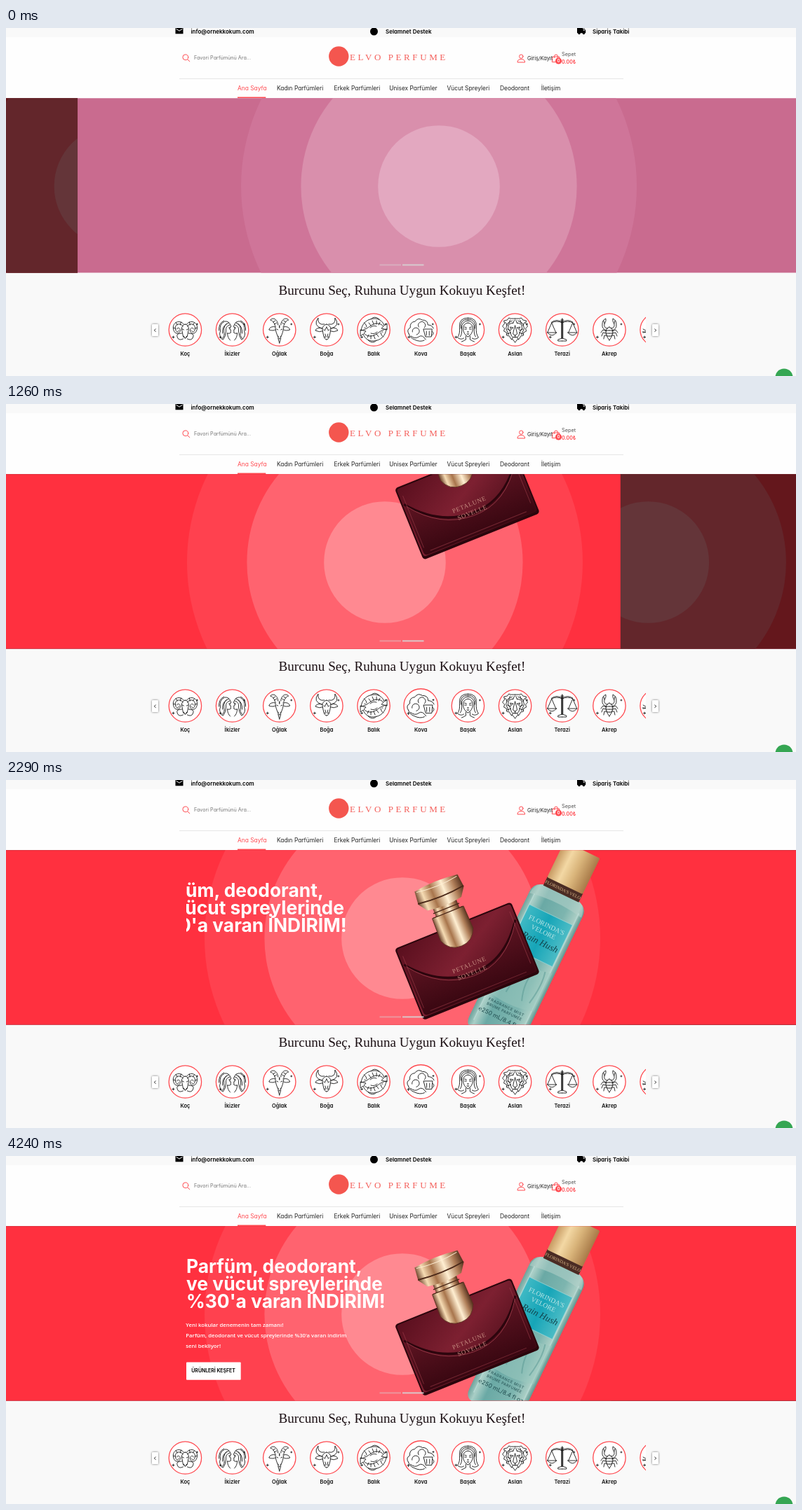
These frames come from a looping animation (1126 by 497 pixels, 6030 ms). An HTML page:

```html
<!DOCTYPE html>
<html lang="tr">
<head>
<meta charset="utf-8">
<title>Parfüm mağazası</title>
<style>
  html, body { margin: 0; width: 100%; height: 100%; overflow: hidden; background: #f9f9f9; }
  svg { display: block; width: 100vw; height: 100vh; font-family: Inter, sans-serif; font-feature-settings: "cv11"; }
  .serif { font-family: "Liberation Serif", serif; }
  .top { font-size: 8px; font-weight: 600; }
  .nav { font-size: 8.4px; fill: #222; }
  .red { fill: #ff4a50; }
  .line { fill: none; stroke: #ff4a50; stroke-width: 1; }
  .heading { font-size: 26.4px; font-weight: 700; font-feature-settings: normal; fill: #fff; }
  .copy { font: 600 7.75px "Open Sans", sans-serif; fill: #fff; }
  .cta { font-size: 6.9px; font-weight: 700; fill: #111; }
  .sign { font-size: 7.5px; font-weight: 600; text-anchor: middle; fill: #111; }
  .art { fill: none; stroke: #1a1a1a; stroke-width: .9; stroke-linejoin: round; stroke-linecap: round; }
  .mid { text-anchor: middle; }
</style>
</head>
<body>
<svg viewBox="0 0 1126 497">
  <defs>
    <linearGradient id="gold">
      <stop offset="0" stop-color="#6b4029"/><stop offset=".16" stop-color="#f6dcb4"/>
      <stop offset=".36" stop-color="#a8754c"/><stop offset=".6" stop-color="#ffefd2"/>
      <stop offset=".82" stop-color="#b1805a"/><stop offset="1" stop-color="#54301d"/>
    </linearGradient>
    <linearGradient id="capGold">
      <stop offset="0" stop-color="#c79a62"/><stop offset=".3" stop-color="#f3d8a4"/>
      <stop offset=".6" stop-color="#d9b47a"/><stop offset="1" stop-color="#a87a48"/>
    </linearGradient>
    <linearGradient id="wine" x2="1" y2="1">
      <stop offset="0" stop-color="#5a0f1e"/><stop offset=".45" stop-color="#7d2031"/>
      <stop offset="1" stop-color="#3c0812"/>
    </linearGradient>
    <linearGradient id="wineLow" x2="0" y2="1">
      <stop offset="0" stop-color="#5e1422"/><stop offset="1" stop-color="#390711"/>
    </linearGradient>
    <linearGradient id="glass">
      <stop offset="0" stop-color="#6da39c"/><stop offset=".12" stop-color="#a9cec6"/>
      <stop offset=".3" stop-color="#6aa9a5"/><stop offset=".7" stop-color="#7db5af"/>
      <stop offset=".9" stop-color="#a9cdc4"/><stop offset="1" stop-color="#5f9790"/>
    </linearGradient>
    <linearGradient id="label">
      <stop offset="0" stop-color="#3fb9c4"/><stop offset=".5" stop-color="#16a5b8"/>
      <stop offset="1" stop-color="#4cbcc5"/>
    </linearGradient>
    <filter id="shade" x="-80%" y="-50%" width="260%" height="200%">
      <feDropShadow dx="0" dy="0" stdDeviation="1.8" flood-opacity=".6"/>
    </filter>
    <clipPath id="stage"><rect y="100.3" width="1126" height="249.3"/></clipPath>
    <clipPath id="darkClip"><rect id="darkEdge" y="100" width="0" height="250"/></clipPath>
    <clipPath id="redClip"><rect id="redEdge" y="100" width="0" height="250"/></clipPath>
    <clipPath id="headClip"><rect x="257" y="138" width="300" height="90"/></clipPath>
    <clipPath id="ctaClip"><rect id="ctaEdge" x="257" y="290" width="0" height="34"/></clipPath>
    <clipPath id="listClip"><rect x="220" y="400" width="692" height="80"/></clipPath>
  </defs>

  <rect width="1126" height="497" fill="#f9f9f9"/>
  <rect y="13" width="1126" height="87.3" fill="#fefefe"/>

  <!-- top bar -->
  <path d="M241.5-1h11v9.3h-11z"/>
  <path d="M242.5 1.2l4.5 3 4.5-3" fill="none" stroke="#fff"/>
  <circle cx="524.5" cy="5" r="5.5"/>
  <path d="M814-1h8v2h2.5l1.7 2.5v3.7h-12.2z"/>
  <path d="M822.8 2h1.4l1 1.6h-2.4z" fill="#fff"/>
  <circle cx="817" cy="7.5" r="1.7"/><circle cx="823.4" cy="7.5" r="1.7"/>
  <g class="top">
    <text x="263.5" y="8">info@ornekkokum.com</text>
    <text x="541" y="8">Selamnet Destek</text>
    <text x="836" y="8">Sipariş Takibi</text>
  </g>

  <!-- header -->
  <g class="line" stroke-linecap="round">
    <circle cx="255.8" cy="41.8" r="3.9"/><path d="M258.7 44.8l3 3"/>
    <circle cx="734.3" cy="40.6" r="2.7"/><path d="M729 48.6q0-4 5.3-4t5.3 4z"/>
    <path d="M779.5 41h9l.8 7.6h-10.6zM781.7 42.5v-2.3q0-2.2 2.3-2.2t2.3 2.2v2.3"/>
  </g>
  <circle cx="787.5" cy="47" r="4.5" class="red"/>
  <text x="787.5" y="49.3" class="mid" font-size="6.2" font-weight="600" fill="#fff">0</text>
  <text x="268" y="45" font-size="7.2" fill="#777">Favori Parfümünü Ara...</text>
  <circle cx="474.3" cy="40.5" r="14.2" fill="#f4564f"/>
  <text x="490" y="46.4" class="serif" font-size="13" letter-spacing="3.6" fill="#f4605c">ELVO PERFUME</text>
  <text x="743" y="45.5" font-size="7.4" fill="#222">Giriş/Kayıt</text>
  <text x="792" y="39.6" font-size="7.3" fill="#555">Sepet</text>
  <text x="792" y="51" font-size="7.1" font-weight="600" class="red">0.00₺</text>
  <path d="M247 72.4h633" stroke="#e5e5e5"/>
  <g class="nav">
    <text x="330" y="88.6" class="red">Ana Sayfa</text>
    <text x="386" y="88.6">Kadın Parfümleri</text>
    <text x="467.5" y="88.6">Erkek Parfümleri</text>
    <text x="546.3" y="88.6">Unisex Parfümler</text>
    <text x="628.5" y="88.6">Vücut Spreyleri</text>
    <text x="704" y="88.6">Deodorant</text>
    <text x="762.7" y="88.6">İletişim</text>
  </g>
  <path d="M330 99.3h40.3" stroke="#ff4a50" stroke-width="1.5"/>

  <!-- slider -->
  <g clip-path="url(#stage)">
    <g id="pink"></g>
    <g clip-path="url(#darkClip)"><g id="dark"></g></g>
    <g clip-path="url(#redClip)">
      <g id="red"></g>
      <g id="mist">
        <g transform="translate(787.5 165) rotate(25.7)">
          <path d="M-26-10h52Q42-6 42 8V206Q42 221 26 221H-26Q-42 221-42 206V8Q-42-6-26-10z" fill="url(#glass)"/>
          <path d="M-26-10h52Q40-6 41 10 0 2-41 10-40-6-26-10z" fill="#b4d2ca" opacity=".55"/>
          <path d="M-34 8V208M35 6V206" stroke="#c4e2dc" stroke-width="2" opacity=".6"/>
          <path d="M-38 100q38 10 76 0v60q-40 12-76 0z" fill="#9ccabf" opacity=".5"/>
          <path d="M-30 102q8 25-2 52M-12 106q6 20 2 46M14 106q-8 22 2 48M28 102q5 20-1 50" fill="none" stroke="#4f918d" stroke-width="2" opacity=".45"/>
          <rect x="-28" y="-22" width="56" height="14" fill="#4b2c24"/>
          <rect x="-28" y="-78" width="56" height="57" rx="2" fill="url(#capGold)"/>
          <rect x="-34" y="25" width="68" height="66" fill="url(#label)" stroke="#a7dbdc" stroke-width=".6"/>
          <g class="serif mid">
            <text y="-12.5" font-size="6.4" fill="#dcb88a">FLORINDA'S VELO</text>
            <text x="1" y="44" font-size="9.6" fill="#bfe6e6">FLORINDA'S</text>
            <text x="1" y="55" font-size="9.6" fill="#bfe6e6">VELORE</text>
            <text x="3" y="71" font-size="13" font-style="italic" fill="#12434c">Rain Hush</text>
          </g>
          <g class="mid" fill="#1f4c4e" font-size="5.4">
            <text y="173" letter-spacing=".6">FRAGRANCE MIST</text>
            <text y="180" letter-spacing=".4">BRUME PARFUMÉE</text>
            <text y="192" font-size="8.4">℮250 mL/8.4 fl oz</text>
          </g>
        </g>
      </g>
      <g id="perfume">
        <g transform="translate(657.5 257.5) rotate(-22)">
          <rect x="-90" y="-54" width="179" height="110" rx="4.5" fill="#2b050c"/>
          <rect x="-88" y="-52" width="175" height="104" rx="4" fill="url(#wine)"/>
          <path d="M-86-28Q-50 18 0 20T85-28V46Q85 51 79 51H-80Q-86 51-86 46z" fill="url(#wineLow)"/>
          <path d="M-86-28Q-50 18 0 20T85-28" fill="none" stroke="#2c050d" stroke-width="3"/>
          <path d="M-84-24Q-50 22 0 24T83-24" fill="none" stroke="#9c3b49" stroke-width=".8"/>
          <path d="M-83-40V40M82-42V38M-76 47H72" fill="none" stroke="#a4414e" opacity=".55"/>
          <path d="M-24-74h48l1 34Q18-22 0-22T-25-40z" fill="url(#gold)" stroke="#5a3020" stroke-width=".8"/>
          <path d="M-18-88h36v14h-36z" fill="url(#gold)"/>
          <path d="M-20-80h40M-23-74h46" stroke="#4a2818" stroke-width="1.3"/>
          <path d="M-33-119q33-5 66 0l2 19-9 13q-26 5-52 0l-9-13z" fill="url(#gold)"/>
          <path d="M-35-101q35 5 70 0" fill="none" stroke="#4a2818" stroke-width="2"/>
          <path d="M-31-117q31 5 62 0" fill="none" stroke="#fff0d6"/>
          <g class="serif mid" fill="#c78c80" font-size="9" letter-spacing=".7">
            <text y="10">PETALUNE</text><text y="22">SOVELLE</text>
          </g>
        </g>
      </g>
      <g clip-path="url(#headClip)">
        <g id="heading" class="heading">
          <text x="257" y="167.4">Parfüm, deodorant,</text>
          <text x="257" y="192.2">ve vücut spreylerinde</text>
          <text x="257" y="217">%30'a varan İNDİRİM!</text>
        </g>
      </g>
      <g id="copy" class="copy">
        <text x="256.3" y="244">Yeni kokular denemenin tam zamanı!</text>
        <text x="256.3" y="259">Parfüm, deodorant ve vücut spreylerinde %30'a varan indirim</text>
        <text x="256.3" y="274">seni bekliyor!</text>
      </g>
      <g clip-path="url(#ctaClip)">
        <rect x="257" y="294.4" width="77.7" height="25.4" rx="1" fill="#fff"/>
        <text id="cta" class="cta" x="264.3" y="309.3"></text>
      </g>
    </g>
    <rect x="532.5" y="337.4" width="30.5" height="2" fill="#d8d0d2" opacity=".45"/>
    <rect x="565" y="337.4" width="30.5" height="2" fill="#d8d0d2" opacity=".9"/>
  </g>

  <!-- zodiac list -->
  <text x="388.5" y="381.3" class="serif" font-size="19.15" fill="#1c1014">Burcunu Seç, Ruhuna Uygun Kokuyu Keşfet!</text>
  <g id="signs" clip-path="url(#listClip)"></g>
  <g fill="#fff" filter="url(#shade)">
    <rect x="208" y="423" width="9" height="17" rx="1.5"/><rect x="921" y="423" width="9" height="17" rx="1.5"/>
  </g>
  <path d="M213.6 429.7l-2.4 2 2.4 2M924.4 429.7l2.4 2-2.4 2" fill="none" stroke="#222" stroke-width=".9"/>
  <circle cx="1109" cy="499" r="12.6" fill="#35a653"/>
</svg>

<script>
const LOOP = 6030, W = 1126, CTA = 'ÜRÜNLERİ KEŞFET';
const $ = id => document.getElementById(id);

// Slide backgrounds: base colour, then rings from large to small.
const slides = {
  pink: ['#c96b8f', '#cf7599', '#d98fac', '#e3a8c0'],
  dark: ['#621318', '#64171c', '#63262b', '#643539'],
  red: ['#ff303f', '#ff414f', '#ff636f', '#ff8991']
};
for (const [id, [base, ...rings]] of Object.entries(slides)) {
  $(id).innerHTML = `<rect x="-${W}" y="100" width="${3 * W}" height="250" fill="${base}"/>` +
    rings.map((c, i) => `<circle cx="565" cy="226" r="${[282, 196.6, 86.8][i]}" fill="${c}"/>`).join('');
}

// Each sign: name, path, and the transform of its repeated half, if any.
const FLIP = 'scale(-1 1)', TURN = 'rotate(180)';
const signs = [
  ['Koç', 'M2-8C8-15 18-11 17-2C16 7 8 7 7 1C7-3 11-4 12-1M3-5C8-11 15-8 14-1C13 4 10 4 9 1M6-11l1 4M13-10l-2 3M17-3l-3 1M0-8Q5-7 5-1L3 9Q2 12 0 12M2 0l2-1M1 10l2-1M5 5q9 0 6 6q-2 5-8 2', FLIP],
  ['İkizler', 'M2-5l2 4-2 1q1 2 0 4 2 2 5 1M2-5Q4-13 11-12 19-8 17 2 20 8 14 14M5-10Q13-7 12 3 10 9 15 13M8-9q7 5 6 14M4-7q6 2 5 9 0 7 4 12M7 5q0 6-4 10M3-3h2M12-13q8 4 7 14', FLIP],
  ['Oğlak', 'M2-7C2-14 9-19 13-14 9-13 7-9 6-5M4-10l3 2M6-13l3 2M5-4Q13-6 15 0 9 2 6 0M6-3Q5 4 3 8 2 12 0 13M2 0l2-1M1 10l1-1M2 12L0 19M0-6v3', FLIP],
  ['Boğa', 'M3-8Q13-6 12-17 20-6 7-2M6-2Q14-4 16 1 10 4 6 2M0-8Q6-6 6-1 5 6 4 9 3 14 0 14M2 1l2-1M1.5 11l1.5-1M0-4l2 4M2 6l-1 4', FLIP],
  ['Balık', 'M-18 1C-17-9-9-16 1-16 8-16 13-12 15-6l4-3v9l-8-2 3-3C10-9 5-10 0-8-6-6-8-1-18 1zM-10-4q-1-5-4-6M-7-10l3 4M-2-13l2 5M4-13v5M9-11l-2 4M-13-3h1M-4-15q5-6 12 0M-5-3q4-4 9-2', TURN],
  ['Kova', 'M-17 6q-4-6 2-9-1-8 7-9 4-6 10-2 8 0 8 7 6 0 8 5M-12 3a5 5 0 1 1 6 4M-3-4a5 5 0 1 1 8 1M-14 9q6 5 11 1t10 4M-17 6q2 6 8 8 8 4 14 1M4-1h12l-1 11H7zM16 2q4 3 0 6M8 2v6M12 2v6'],
  ['Başak', 'M0-10Q7-9 7-1 6 7 0 10M0-17Q13-17 12-4 11 6 15 11 10 15 6 12M0-13Q9-12 9-2 8 6 11 10M3 9v5q3 2 6 3M2-1h3M2-3l3-1M0 6h1.5M0 3h1M0-15q12 0 10 13', FLIP],
  ['Aslan', 'M0-16h6l3-1 2 3 5 1-1 4 3 4-3 3 1 4-4 2v4l-4 1-2 4-3 1-3 4M3-10l6 2 1 6-3 5-2 6M4-13l7 4 2 7-4 9M0-6l2 7 1 5-3 2M3-3l4-1-1 3zM0 8v3l4-1M6 1l5-2M6 4l5 2M3 11l2 3M1-14l2 5M7-14l2 5M14-11l-3 5', FLIP],
  ['Terazi', 'M0-16V12M1-13V12M0-11q8-5 15 0M0-10q8-4 15 0M15-10L9 4M15-10l6 14M8 4h13M8 4q7 8 13 0M0 12l6 2v2H0M0-14h2', FLIP],
  ['Akrep', 'M2-2Q8-2 7-8 4-13 5-16q5 2 5 8 1 7-6 9M7-9l1-4M4 2l5-2 3 4M4 5l5-1 2 5M3 8l4 0 1 5M0-4Q5-2 5 3 5 8 0 15M0 1h4M0 5h4M0 9h3', FLIP],
  ['Yay', 'M19-1L12 3l7 1M20 3H8', FLIP]
];
$('signs').innerHTML = signs.map(([name, d, half], i) => {
  const x = 255.4 + 67.17 * i;
  const twin = half ? `<path d="${d}" transform="${half}"/>` : '';
  return `<g transform="translate(${x} 431)"><g id="sign${i}">
    <circle r="23.2" fill="#fff" stroke="#ff4a50" stroke-width="1.3"/>
    <g class="art"><path d="${d}"/>${twin}
    <path d="M-17 9v3m-1.5-1.5h3M17-9v2m-1-1h2"/></g></g></g>
    <text class="sign" x="${x}" y="467.7">${name}</text>`;
}).join('');

$('cta').innerHTML = [...CTA].map(c => `<tspan>${c}</tspan>`).join('');
const letters = [...$('cta').children];

// Progress with a power ease-out.
const out = (t, start, length, power) =>
  1 - (1 - Math.min(1, Math.max(0, (t - start) / length))) ** power;
const move = (id, x, y = 0) => $(id).setAttribute('transform', `translate(${x} ${y})`);
const width = (id, w) => $(id).setAttribute('width', w);

function render(t) {
  const darkX = W * out(t, -31, 690, 2);
  const redX = W * out(t, 707, 1048, 2);
  width('darkEdge', darkX);
  width('redEdge', redX);
  move('pink', .51 * darkX);
  move('dark', .4 * (redX + darkX - W));
  move('red', -.1 * (W - redX));

  move('perfume', 0, -250 * (1 - out(t, 1088, 800, 3)));
  move('mist', 0, 300 * (1 - out(t, 1426, 1160, 3)));
  move('heading', -290 * (1 - out(t, 1771, 1221, 3)));

  const copy = out(t, 2420, 1100, 3);
  move('copy', -26 * (1 - copy));
  $('copy').setAttribute('opacity', copy);

  width('ctaEdge', 78 * out(t, 2690, 560, 2));
  letters.forEach((el, i) => el.setAttribute('fill-opacity', out(t, 3190 + 36 * i, 260, 2)));

  $('sign5').setAttribute('transform', `scale(${1 + .045 * out(t, 200, 300, 2)})`);
}

const start = performance.now();
function tick() {
  render((performance.now() - start) % LOOP);
  requestAnimationFrame(tick);
}
tick();
</script>
</body>
</html>
```
